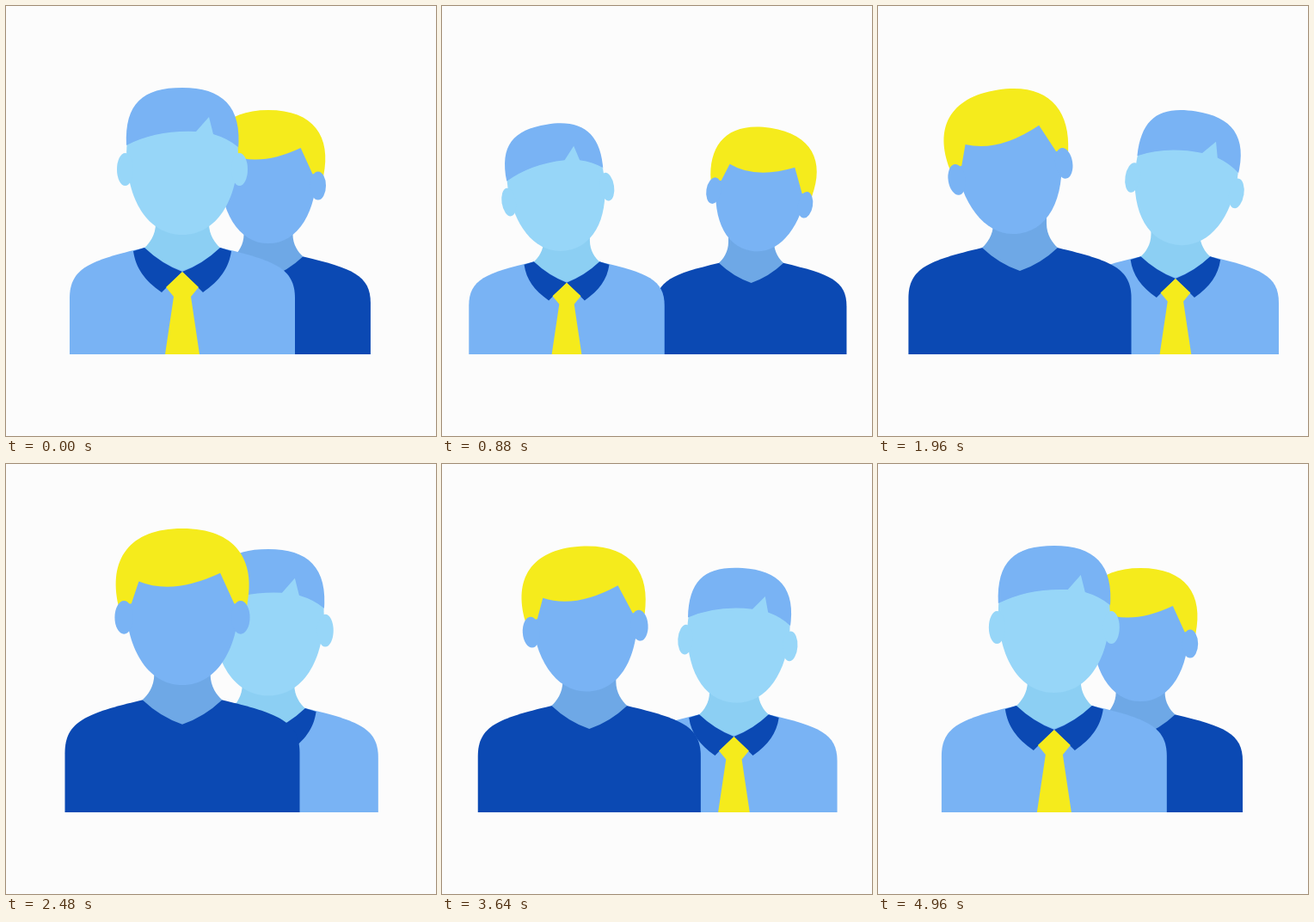
An HTML page that plays this animation: 500x500 px, repeating every 5000 ms.

```html
<!DOCTYPE html>
<html lang="en">
<head>
<meta charset="utf-8">
<title>Two colleagues</title>
<style>
  html, body { margin: 0; width: 100%; height: 100%; overflow: hidden; background: #fcfcfc; }
  svg { display: block; width: 100vw; height: 100vh; }
  .sky { fill: #79b3f4; }
  .navy { fill: #0b49b3; }
  .sun { fill: #f5eb1c; }
  .pale { fill: #97d6f8; }
  .pale-neck { fill: #8ccff3; }
  .sky-neck { fill: #6ea8e6; }
</style>
</head>
<body>
<svg viewBox="0 0 500 500">
  <defs>
    <path id="torso" d="M-131 0V-65C-131-100-108-109-44-124H44C108-109 131-100 131-65V0Z"/>
    <path id="neck" d="M-31-165V-152C-31-139-38-129-44-124Q-24-105 0-97Q24-105 44-124C38-129 31-139 31-152V-165Z"/>
    <path id="collar" d="M-57-120L-44-124Q-24-105 0-96L-24-72C-44-86-54-100-57-120Z"/>
    <path id="face" d="M-63-96C-63-41-39 0 0 0C39 0 63-41 63-96C63-130 40-150 0-150C-40-150-63-130-63-96Z"/>
  </defs>

  <g id="blond">
    <use href="#torso" class="navy" transform="scale(.989 1)"/>
    <use href="#neck" class="sky-neck"/>
    <g class="head">
      <use href="#face" class="sky" transform="scale(.98 1)"/>
      <path class="sun" d="M-69-86C-80-135-58-169 0-169C58-169 80-135 70-86L56-88L41-121Q-10-97-47-112L-55-88Z"/>
      <g class="sky">
        <ellipse cx="-63" cy="-73" rx="10" ry="18"/>
        <ellipse cx="63" cy="-73" rx="10" ry="18"/>
      </g>
    </g>
  </g>

  <g id="tied">
    <use href="#torso" class="sky"/>
    <use href="#neck" class="pale-neck"/>
    <use href="#collar" class="navy"/>
    <use href="#collar" class="navy" transform="scale(-1 1)"/>
    <path class="sun" d="M0-96L-19-78L-10-67L-20 0H20L10-67L19-78Z"/>
    <g class="head">
      <use href="#face" class="pale" transform="scale(1.03 1)"/>
      <path class="sky" d="M-65-104C-67-153-46-171 0-171C46-171 70-150 65-98V-102Q53-112 36-117L31-137L16-120Q-30-122-65-104Z"/>
      <g class="pale">
        <ellipse cx="-66.5" cy="-76" rx="9.5" ry="19"/>
        <ellipse cx="66.5" cy="-76" rx="9.5" ry="19"/>
      </g>
    </g>
  </g>
</svg>
<script>
const LOOP = 5000, FLOOR = 405;

// Poses: tied x, tied scale, blond x, blond scale, head scale
const tiedFront = [205, 1, 305, .918, 1];
const tiedLeft = [139, .855, 365, .85, 1];
const blondLeft = [351, .917, 160, 1, 1];
const blondFront = [305, .917, 205, 1, 1];
const closeUp = [305, 1.122, 205, 1.187, 1.074];

const poses = [
  [0, tiedFront], [580, tiedFront], [1000, tiedLeft], [1840, blondLeft],
  [2240, blondFront], [2820, closeUp], [3400, blondFront],
  [3800, blondLeft], [4520, tiedLeft], [LOOP, tiedFront]
];
const tilts = [
  [0, [0]], [580, [0]], [1000, [9.8]], [1840, [-9.8]], [2240, [0]],
  [3460, [0]], [3860, [-9.8]], [4520, [9.8]], [LOOP, [0]]
];

const ease = p => p < .5 ? 4 * p ** 3 : 1 - 4 * (1 - p) ** 3;

function sample(track, t) {
  const i = track.findIndex(key => key[0] > t);
  const [t0, from] = track[i - 1], [t1, to] = track[i];
  const k = ease((t - t0) / (t1 - t0));
  return from.map((v, j) => v + (to[j] - v) * k);
}

const tied = document.getElementById('tied');
const blond = document.getElementById('blond');
const svg = document.querySelector('svg');

function place(person, x, scale, chin, tilt, headScale) {
  person.setAttribute('transform', `translate(${x} ${FLOOR}) scale(${scale})`);
  person.querySelector('.head').setAttribute('transform',
    `translate(0 ${chin}) rotate(${tilt}) scale(${headScale})`);
}

function draw(t) {
  const [tx, ts, bx, bs, head] = sample(poses, t);
  const [tilt] = sample(tilts, t);
  place(tied, tx, ts, -139, -tilt, head);
  place(blond, bx, bs, -140.5, tilt, head);
  const front = t < 1000 || t >= 4520 ? tied : blond;
  if (svg.lastElementChild !== front) svg.append(front);
}

const start = performance.now();
function tick() {
  draw((performance.now() - start) % LOOP);
  requestAnimationFrame(tick);
}
tick();
</script>
</body>
</html>
```
